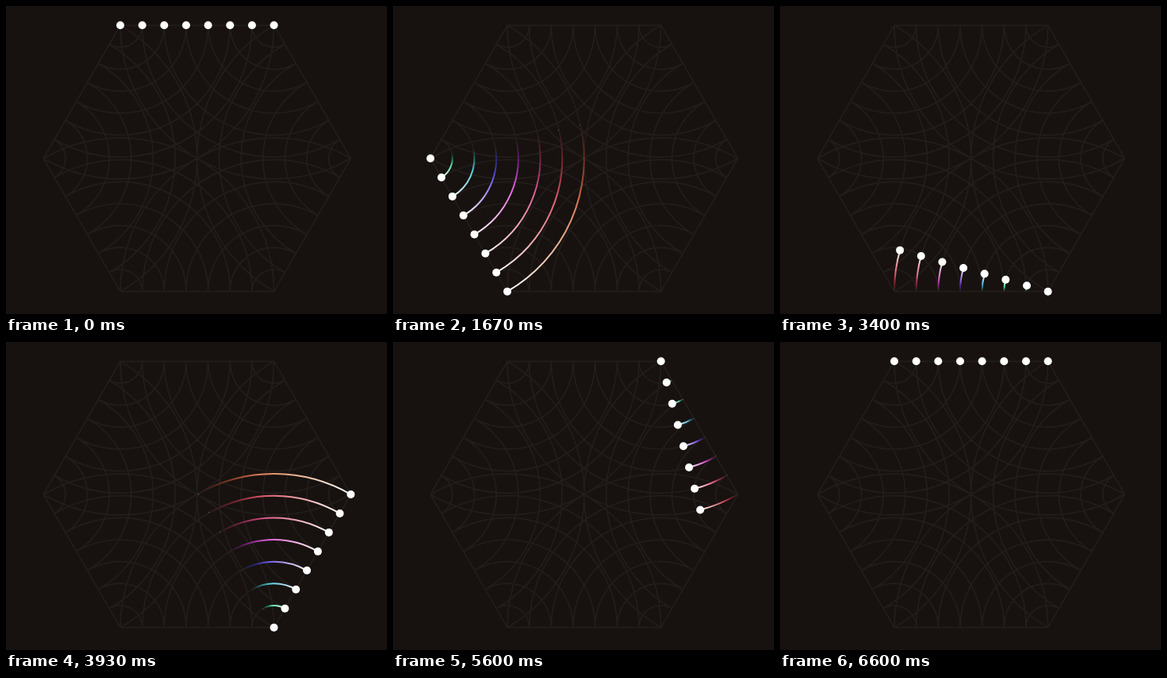
Recreate the animation shown at these times as an HTML page with a canvas. Size 480x388 px, loop 6670 ms.

```html
<!DOCTYPE html>
<html lang="en">
<head>
<meta charset="utf-8">
<title>Hexagon arcs</title>
<style>
  html, body { margin: 0; height: 100%; overflow: hidden; background: #17120f; }
  canvas { display: block; }
</style>
</head>
<body>
<canvas id="stage" width="480" height="388"></canvas>
<script>
const ctx = document.getElementById('stage').getContext('2d');
const TAU = Math.PI * 2, TURN = TAU / 3;
const CX = 240.8, CY = 192, R = 193.6, DOTS = 8, GAP = R / (DOTS - 1);
const LOOP = 6670, TICK = 66.7, STEP = 16.5; // STEP and easing times are in ticks
const HUES = [150, 158, 190, 255, 305, 340, 352, 380, 400, 410];

const clamp = (v, lo = 0, hi = 1) => Math.min(hi, Math.max(lo, v));

// The dots turn about each corner in order, anticlockwise round the hexagon.
function pivot(k) {
  const a = -TURN - k * TAU / 6;
  return { x: CX + R * Math.cos(a), y: CY + R * Math.sin(a), start: -k * TAU / 6 };
}

// Short run-up, steady turn, long soft landing.
function headEase(p) {
  if (p < 0.68) return 0.147 * p * p;
  if (p < 4.2) return 0.2 * (p - 0.34);
  return 1 - 0.228 * (1 - clamp((p - 4.2) / 4.56)) ** 4;
}

const tailEase = p => (1 - Math.cos(Math.PI * clamp((p - 2.5) / 12.8))) / 2;

function hueAt(k) {
  k = clamp(k, 0, HUES.length - 1.001);
  const i = Math.floor(k);
  return HUES[i] + (HUES[i + 1] - HUES[i]) * (k - i);
}

function drawGrid() {
  ctx.strokeStyle = '#221d1a';
  ctx.lineWidth = 1.7;
  ctx.beginPath();
  for (let k = 0; k < 6; k++) {
    const c = pivot(k), next = pivot(k + 1);
    ctx.moveTo(c.x, c.y);
    ctx.lineTo(next.x, next.y);
    for (let i = 1; i < DOTS; i++) {
      const r = i * GAP;
      ctx.moveTo(c.x + r * Math.cos(c.start), c.y + r * Math.sin(c.start));
      ctx.arc(c.x, c.y, r, c.start, c.start + TURN);
    }
  }
  ctx.stroke();
}

function drawTrail(c, i, tail, head) {
  const from = c.start + tail * TURN, span = (head - tail) * TURN;
  const paint = ctx.createConicGradient(from, c.x, c.y);
  for (let s = 0; s <= 10; s++) {
    const u = s / 10;
    const hue = hueAt(i - 1 + 1.3 * (tail + (head - tail) * u));
    const light = 44 + 56 * u ** 1.3;
    paint.addColorStop(u * span / TAU, `hsla(${hue % 360}, 68%, ${light}%, ${clamp(u * 2.4)})`);
  }
  ctx.strokeStyle = paint;
  ctx.lineWidth = 2;
  ctx.beginPath();
  ctx.arc(c.x, c.y, i * GAP, from, from + span);
  ctx.stroke();
}

function draw(now) {
  const q = clamp(now % LOOP / TICK - 0.5, 0, 6 * STEP);
  const p = q % STEP;
  const c = pivot(Math.floor(q / STEP) % 6);
  const head = headEase(p), tail = tailEase(p);
  const angle = c.start + head * TURN;

  ctx.fillStyle = '#17120f';
  ctx.fillRect(0, 0, 480, 388);
  drawGrid();
  if (head - tail > 0.002) {
    for (let i = 1; i < DOTS; i++) drawTrail(c, i, tail, head);
  }
  ctx.fillStyle = '#fff';
  for (let i = 0; i < DOTS; i++) {
    ctx.beginPath();
    ctx.arc(c.x + i * GAP * Math.cos(angle), c.y + i * GAP * Math.sin(angle), 5, 0, TAU);
    ctx.fill();
  }
}

const born = performance.now();
function loop() {
  draw(performance.now() - born);
  requestAnimationFrame(loop);
}
loop();
</script>
</body>
</html>
```
